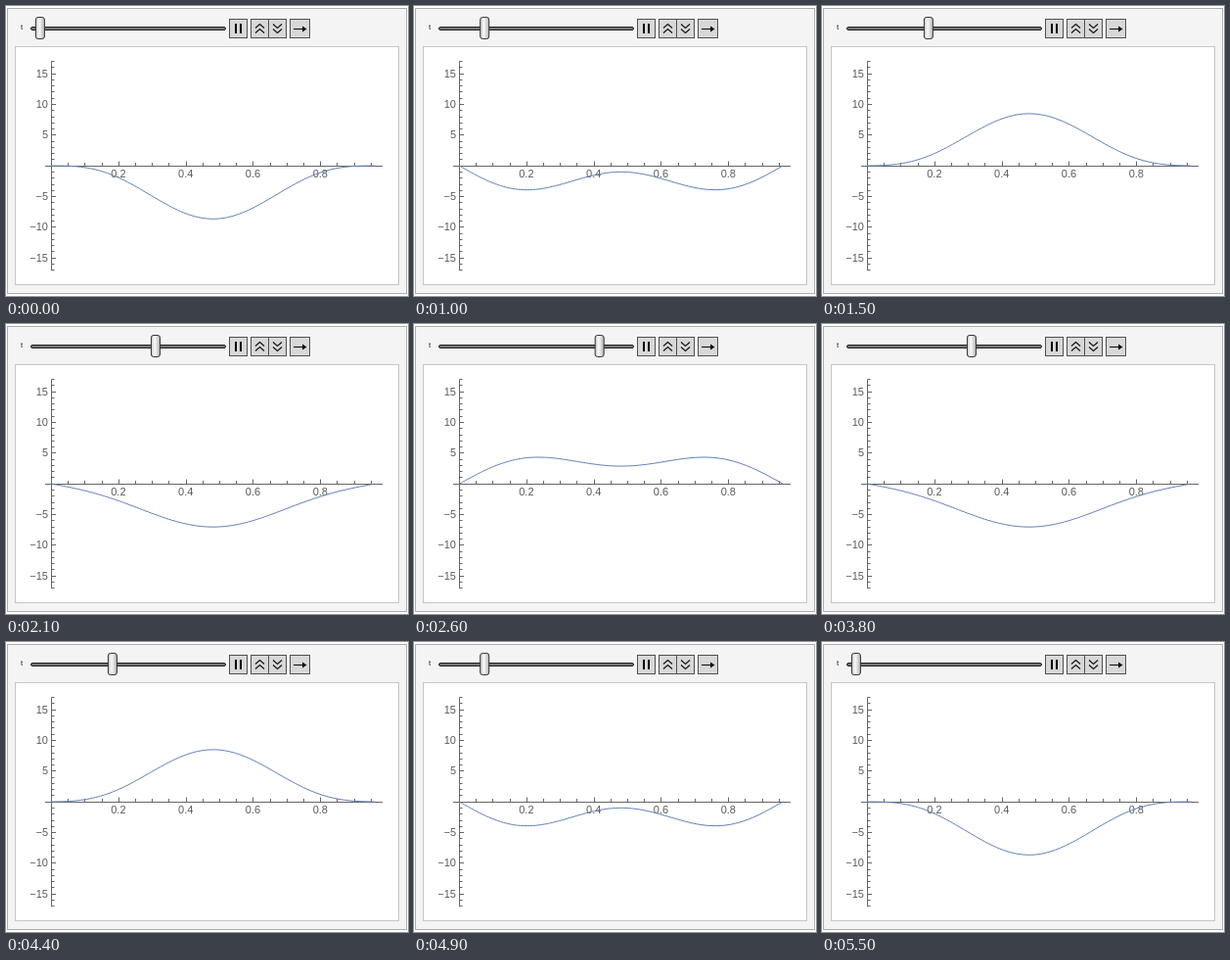
These frames come from a looping animation (411 by 296 pixels, 6000 ms). An HTML page:

```html
<!DOCTYPE html>
<html lang="en">
<head>
<meta charset="utf-8">
<title>Vibrating string</title>
<style>
  html, body { margin: 0; width: 100%; height: 100%; overflow: hidden; background: #fff; }
  svg { display: block; width: 411px; height: 296px; }
  text { font-family: "Liberation Sans", Arial, sans-serif; font-size: 11px; fill: #585858; }
  .button { fill: #d8d8d8; stroke: #505050; }
  .icon { fill: none; stroke: #111; stroke-width: 1.1; }
  .axis { fill: none; stroke: #666; }
</style>
</head>
<body>
<svg viewBox="0 0 411 296">
  <defs>
    <linearGradient id="knob">
      <stop offset="0" stop-color="#c4c4c4"/>
      <stop offset=".4" stop-color="#fafafa"/>
      <stop offset="1" stop-color="#b4b4b4"/>
    </linearGradient>
  </defs>
  <rect x="1.5" y="2.5" width="408" height="291" fill="#f4f4f4" stroke="#adadad"/>
  <rect x="9.5" y="41.5" width="392" height="243" fill="#fff" stroke="#c6c6c6"/>

  <text x="15" y="24" style="font-size:8px;fill:#223">t</text>
  <rect x="25.5" y="21.5" width="199" height="3" rx="1.5" fill="#777" stroke="#222"/>
  <rect id="thumb" y="11.5" width="9" height="22" rx="2.5" fill="url(#knob)" stroke="#333"/>

  <g class="button">
    <rect x="228.5" y="13.5" width="18" height="19"/>
    <rect x="250.5" y="13.5" width="18" height="19"/>
    <rect x="268.5" y="13.5" width="18" height="19"/>
    <rect x="290.5" y="13.5" width="20" height="19"/>
  </g>
  <path d="M234 18h2v10h-2zM239 18h2v10h-2z" fill="#000"/>
  <path class="icon" d="M255 22.5l4.5-4 4.5 4M255 27.5l4.5-4 4.5 4"/>
  <path class="icon" d="M273 18.5l4.5 4 4.5-4M273 23.5l4.5 4 4.5-4"/>
  <path class="icon" d="M294 23.5h10"/>
  <path d="M303 20.5l4.5 3-4.5 3z" fill="#111"/>

  <path id="axes" class="axis"/>
  <g id="labels"></g>
  <path id="curve" fill="none" stroke="#5e81b5"/>
</svg>
<script>
const el = id => document.getElementById(id);
const ORIGIN = { x: 46.5, y: 163.5 }, UNIT = { x: 344, y: 6.27 };
const LENGTH = 330.5, AMPLITUDE = 54.2, REST = 163.1;
const STEP = 100, LAST = 25, LOOP = 6000;
const PHASE_STEP = 625.44 * Math.PI / 180;

const crisp = v => Math.floor(v) + 0.5;

function addLabel(str, x, y, anchor) {
  const node = document.createElementNS("http://www.w3.org/2000/svg", "text");
  node.setAttribute("x", x);
  node.setAttribute("y", y);
  node.setAttribute("text-anchor", anchor);
  node.textContent = str;
  el("labels").append(node);
}

function drawAxes() {
  let d = `M40 ${ORIGIN.y}H385M${ORIGIN.x} 56.5V270`;
  for (let n = -17; n <= 17; n++) {
    const major = n % 5 === 0;
    const y = 163.2 - n * UNIT.y;
    d += `M${ORIGIN.x} ${crisp(y)}h${major ? 4.5 : 3}`;
    if (major && n) addLabel(String(n).replace("-", "\u2212"), 43, Math.round(y + 3.6), "end");
  }
  for (let n = 1; n <= 19; n++) {
    const major = n % 4 === 0;
    const x = ORIGIN.x + n * 0.05 * UNIT.x;
    d += `M${crisp(x)} ${ORIGIN.y}v${major ? -5 : -3.5}`;
    if (major) addLabel((n * 0.05).toFixed(1), x - 0.4, 175, "middle");
  }
  el("axes").setAttribute("d", d);
}

// First and third harmonics of a string released from a sin^3 shape
function stringPath(phase) {
  const a = 0.75 * Math.cos(phase), b = 0.25 * Math.cos(3 * phase), n = 110;
  let d = "";
  for (let i = 0; i <= n; i++) {
    const q = Math.PI * i / n;
    const y = REST + AMPLITUDE * (a * Math.sin(q) - b * Math.sin(3 * q));
    d += (i ? "L" : "M") + (ORIGIN.x + LENGTH * i / n).toFixed(2) + " " + y.toFixed(2);
  }
  return d;
}

// Forward 25 steps, short hold, then back again
function stepAt(ms) {
  const clamp = v => Math.max(0, Math.min(LAST, v));
  return ms < 3000
    ? clamp(Math.floor((ms - 400) / STEP))
    : clamp(LAST - Math.floor((ms - 3000) / STEP));
}

let shown = -1;
function render(ms) {
  const step = stepAt(ms % LOOP);
  if (step === shown) return;
  shown = step;
  const t = Math.max(0, step - 0.917);
  el("thumb").setAttribute("x", (30.4 + 7.34 * t).toFixed(2));
  el("curve").setAttribute("d", stringPath(PHASE_STEP * t));
}

drawAxes();
render(0);
const start = performance.now();
function tick() {
  render(performance.now() - start);
  requestAnimationFrame(tick);
}
requestAnimationFrame(tick);
</script>
</body>
</html>
```
